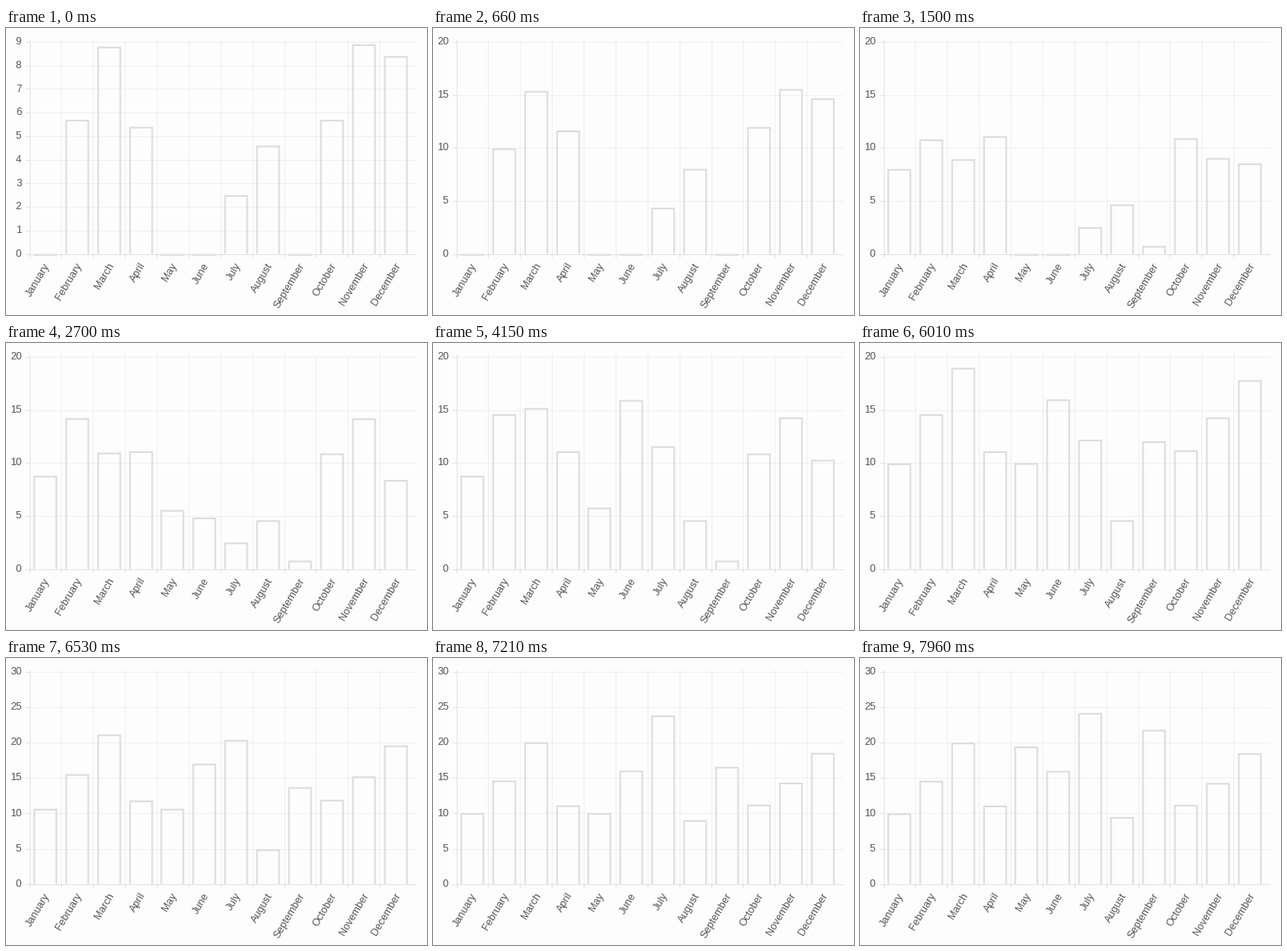
These frames come from a looping animation (514 px wide and 350 px high, 8000 ms). A matplotlib script:

```python
import math

import matplotlib.pyplot as plt
import numpy as np
from matplotlib.animation import FuncAnimation
from matplotlib.collections import LineCollection

W, H, DPI = 514, 350, 64
LOOP, STEP = 8000, 20
PT = 72 / DPI                      # points per pixel

TOP, BASE, LEFT, RIGHT = 17, 275.7, 29, 501
PITCH, BAR_W, ANGLE = 38.87, 29, 59
GRID, AXIS = (0, 0, 0, .05), (0, 0, 0, .1)
BAR_COLOR, TEXT_COLOR = "#dcdcdc", "#555555"

FIRST, PERIOD, EASE = 136, 204.3, 1000

# first value of each month, then its rises as {tick: value}
SALES = {
    "January": (0, {4: 8.8, 25: 10}),
    "February": (5.7, {3: 10.9, 10: 14.6}),
    "March": (8.8, {11: 11.7, 13: 15.2, 20: 18.1, 28: 20}),
    "April": (5.4, {2: 11.1}),
    "May": (0, {9: 5.8, 22: 10, 36: 20.8}),
    "June": (0, {12: 12.8, 15: 16}),
    "July": (2.5, {15: 6.4, 17: 12.2, 29: 20.7, 32: 24.2}),
    "August": (4.6, {32: 9.5}),
    "September": (0, {3: .8, 20: 8.6, 27: 13, 34: 22}),
    "October": (5.7, {2: 10.9, 21: 11.2}),
    "November": (8.9, {8: 14.3}),
    "December": (8.4, {17: 10.5, 26: 18.5}),
}
COUNT = len(SALES)


def axis_max(values):
    unit = 10 ** math.floor(math.log10(max(values)))
    return math.ceil(max(values) / unit) * unit


def to_y(values, top):
    return BASE - np.asarray(values) * (BASE - TOP) / top


def state(t):
    """Axis maximum and bar tops; each tick restarts a quartic ease-out."""
    values = [first for first, _ in SALES.values()]
    top = axis_max(values)
    y = to_y(values, top)
    for tick in range(math.ceil((t - FIRST) / PERIOD)):
        values = [rises.get(tick, v)
                  for v, (_, rises) in zip(values, SALES.values())]
        top = axis_max(values)
        goal = to_y(values, top)
        age = min(t - FIRST - tick * PERIOD, PERIOD)
        y = goal + (y - goal) * (1 - age / EASE) ** 4
    return top, y


def slot_x(i):
    return round(48 + PITCH * i)


fig = plt.figure(figsize=(W / DPI, H / DPI), dpi=DPI, facecolor="#fdfdfd")
ax = fig.add_axes([0, 0, 1, 1])
ax.set_xlim(0, W)
ax.set_ylim(H, 0)
ax.axis("off")


def add_lines(segments, color):
    lines = LineCollection(segments, colors=[color], linewidths=PT,
                           capstyle="butt")
    lines.set_snap(False)
    ax.add_collection(lines, autolim=False)
    return lines


def add_text(x, y, label, **kw):
    return ax.text(x, y, label, ha="right", va="baseline", color=TEXT_COLOR,
                   family="Liberation Sans", size=12.6 * PT, **kw)


def make_scale(top):
    """Horizontal grid, ticks and numbers for one axis maximum."""
    parts, grid, dark = [], [], []
    for v in range(0, top + 1, 1 if top <= 10 else 5):
        y = float(to_y(v, top))
        row = round(y) + .5
        (grid if v else dark).append([(LEFT, row), (RIGHT, row)])
        dark.append([(LEFT - 5, row), (LEFT, row)])
        parts.append(add_text(LEFT - 10, y + 3.1, str(v)))
    return parts + [add_lines(grid, GRID), add_lines(dark, AXIS)]


columns = [slot_x(i - .5) + .5 for i in range(COUNT)]
uprights = [[(x, TOP - 3), (x, BASE)] for x in columns]
add_lines(uprights[1:], GRID)
add_lines(uprights[:1] + [[(x, BASE), (x, BASE + 5)] for x in columns], AXIS)
for i, month in enumerate(SALES):
    add_text(slot_x(i) + 5.8, BASE + 13.5, month,
             rotation=ANGLE, rotation_mode="anchor")

scales = {top: make_scale(top) for top in (9, 20, 30)}

# open outlines: up, across, down, then a break
sides = np.array([-1, -1, 1, 1, np.nan]) * (BAR_W / 2 - 1)
bar_x = np.array([slot_x(i) + sides for i in range(COUNT)])
bars, = ax.plot([], [], color=BAR_COLOR, lw=2 * PT, snap=False, zorder=3,
                solid_joinstyle="miter", solid_capstyle="butt")


def draw(frame):
    top, y = state(frame * STEP)
    for scale, parts in scales.items():
        for part in parts:
            part.set_visible(scale == top)
    bar_y = np.full((COUNT, 5), BASE)
    bar_y[:, 1:3] = (y + 1)[:, None]
    bars.set_data(bar_x.ravel(), bar_y.ravel())
    return [bars]


anim = FuncAnimation(fig, draw, frames=LOOP // STEP, interval=STEP,
                     repeat=True, repeat_delay=0)
plt.show()
```
